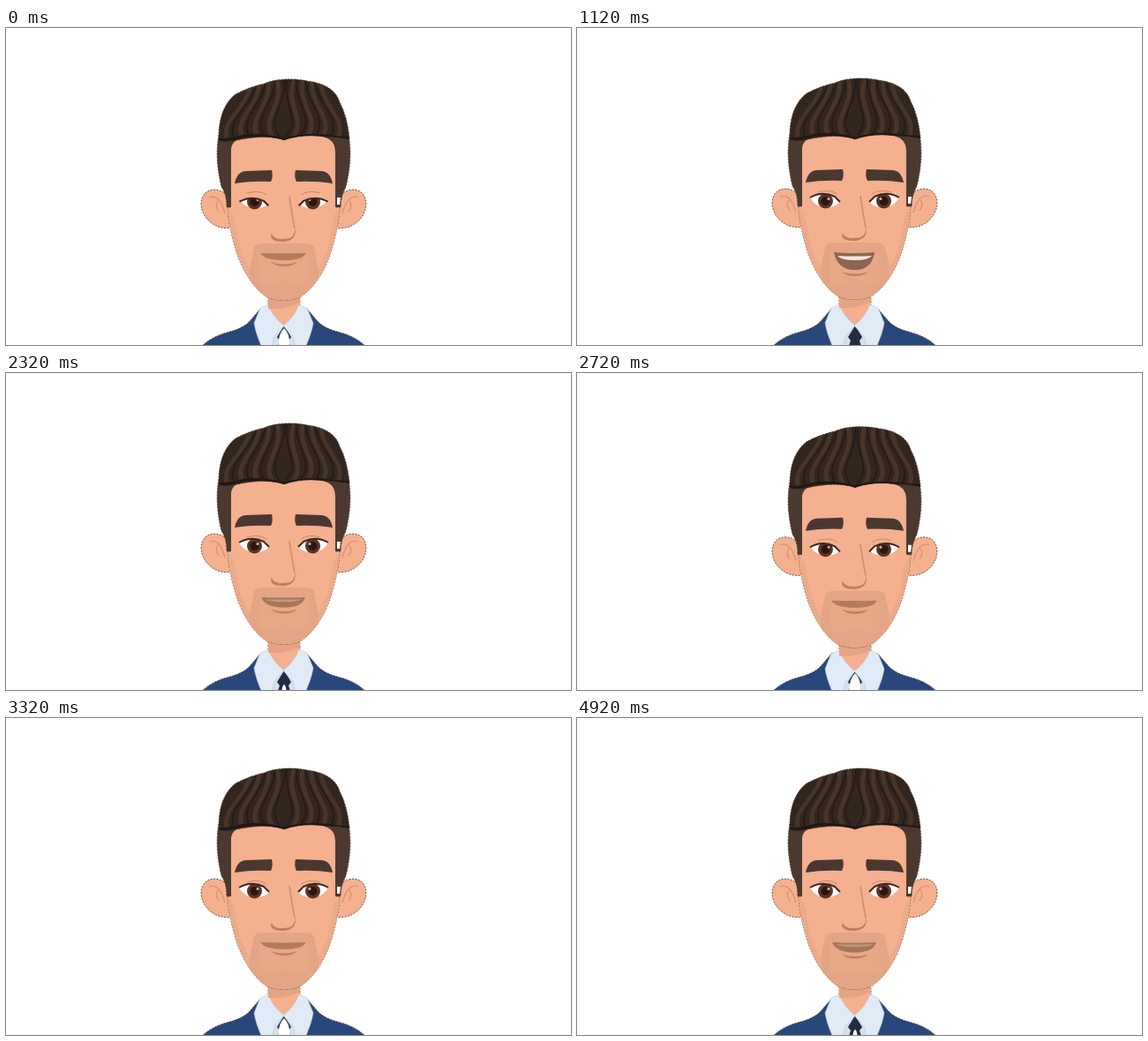
Animation of 640x359 px, one loop 5000 ms. Source, as an HTML page without scripts:

```html
<!DOCTYPE html>
<html lang="en">
<head>
<meta charset="utf-8">
<title>Talking man</title>
<style>
@property --nod { syntax: "<number>"; inherits: true; initial-value: 0; }
@property --lid { syntax: "<number>"; inherits: true; initial-value: 0; }
@property --open { syntax: "<number>"; inherits: true; initial-value: 0; }
@property --gap { syntax: "<number>"; inherits: true; initial-value: 0; }

html, body { margin: 0; width: 100%; height: 100%; overflow: hidden; background: #fff; }
svg { display: block; width: 100vw; height: 100vh; animation: nod 2.5s infinite, blink 2.5s infinite, talk 2.5s infinite, gap 2.5s infinite; }

@keyframes nod {
  0% { --nod: .25; }
  8%, 12% { --nod: 1; }
  56% { --nod: .8; }
  20%, 48%, 64%, 100% { --nod: 0; }
}
@keyframes blink {
  0%, 3% { --lid: 1; }
  10% { --lid: .4; }
  18%, 100% { --lid: 0; }
}
@keyframes talk {
  0%, 12%, 32%, 36%, 56%, 78% { --open: 0; }
  22%, 45%, 48%, 64%, 68% { --open: 1; }
  92%, 100% { --open: .3; }
}
@keyframes gap {
  0%, 12%, 32%, 36% { --gap: 1; }
  44%, 49% { --gap: 0; }
  64%, 100% { --gap: .4; }
}

.head { transform: translateY(calc(var(--nod) * 3.7px)); }
.collar { transform: translateY(calc(var(--nod) * 1px)); }
.lid { transform: translateY(calc(var(--lid) * 4px)); }
.gap { transform: scale(var(--gap)); transform-origin: 315px 361px; }
.mouth {
  transform: scale(calc(1.12 - .12 * var(--open)), calc(.4 + .6 * var(--open)));
  transform-origin: 314px 254px;
  fill: color-mix(in srgb, #8d6653 calc(var(--open) * 100%), #b37b5b);
}
.teeth { opacity: var(--open); }
.chin { transform: translateY(calc(var(--open) * 12px)); }
.edge { stroke: #4a3529; stroke-width: .8; stroke-dasharray: 2 1.5; }
</style>
</head>
<body>
<svg viewBox="0 0 640 359" preserveAspectRatio="none">
  <defs>
    <clipPath id="eyeClip"><path d="M262 180H300V198C290 208 270 208 262 192Z"/></clipPath>
    <path id="hair" d="M241 126Q240 90 260 74Q275 66 293 62C306 56 327 56 341 59Q372 63 378 83Q387 100 389 125Q374 122 360 122Q335 119 315 126Q295 119 262 126Q248 130 241 126Z"/>
    <clipPath id="hairClip"><use href="#hair"/></clipPath>
    <path id="strand" d="M0 0C-14-20 10-34 0-62" stroke-width="5"/>
    <path id="line" d="M0 0C-16-20 4-34 0-62" stroke="#231914" stroke-width="1.4"/>
    <g id="lock"><use href="#strand"/><use href="#line" x="8"/></g>

    <g id="ear">
      <path class="edge" d="M256 196C247 177 221 177 221 199C222 215 238 229 256 225Z" fill="#f4b08f"/>
      <path d="M230 191C238 188 244 194 248 209M240 195Q236 201 241 207" fill="none" stroke="#d98f70" stroke-width="1.2"/>
    </g>

    <g id="eye">
      <path d="M264 192Q278 184 292 191L298 197C290 206 271 206 264 192Z" fill="#fff"/>
      <g clip-path="url(#eyeClip)">
        <circle cx="281.5" cy="196" r="8.5" fill="#5c3424"/>
        <circle cx="281.5" cy="196" r="5" fill="#2c1610"/>
        <circle cx="285" cy="193.5" r="1.5" fill="#c9b5aa"/>
        <g class="lid">
          <path d="M260 170H302V197H298L292 191Q278 184 264 192H260Z" fill="#f4b08f"/>
          <path d="M264 192Q278 184 292 191L298 197" fill="none" stroke="#3a2822" stroke-width="2"/>
        </g>
      </g>
      <path d="M273 186Q286 182 295 188" fill="none" stroke="#c98968"/>
    </g>

    <path id="brow" d="M259 175Q262 161 272 161L301 160Q303 167 300 173Q278 172 259 175Z" fill="#4a3830"/>
    <g id="suit">
      <path class="edge" d="M222 360Q234 349 250 345Q270 340 277 331L289 317L301 366H222Z" fill="#28477a"/>
      <path d="M281 334L291 366" stroke="#1d355f" stroke-width="1.2"/>
    </g>
    <path id="collar" d="M288 317L297 313Q302 327 315 337L304 349L300 366H292Q283 347 281 334Z" fill="#e1ebf6" stroke="#bccbdc" stroke-width=".6"/>
    <path id="jaw" d="M251 202Q252 222 259 246C266 272 281 295 296 304Q315 311 333 304C350 293 363 272 370 246Q377 222 378 202Z"/>
    <clipPath id="jawClip"><use href="#jaw"/></clipPath>
  </defs>

  <rect width="640" height="359" fill="#fff"/>

  <path class="edge" d="M297 296H333V325L315 339L297 325Z" fill="#f4b08f"/>
  <path d="M299 366L304 347L315 336L326 347L330 366Z" fill="#d5e0ed"/>
  <path d="M315 337L323 350L320 354L324 366H306L310 354L307 350Z" fill="#222b40"/>
  <path class="gap" d="M315 340Q323 347 321 366H309Q307 347 315 340Z" fill="#fff"/>
  <use href="#suit"/>
  <use href="#suit" transform="matrix(-1 0 0 1 629 0)"/>
  <g class="collar">
    <use href="#collar"/>
    <use href="#collar" transform="matrix(-1 0 0 1 629 0)"/>
  </g>

  <g class="head">
    <path d="M297 300H333V310Q318 318 297 317Z" fill="#e4a384"/>
    <use href="#ear"/>
    <use href="#ear" transform="matrix(-1 0 0 1 629 0)"/>
    <path class="edge" d="M241 120Q236 146 244 179Q250 187 250 202H379Q379 190 385 179Q393 146 388 120Z" fill="#4b392f"/>
    <path d="M375 191H379L378 199H375Z" fill="#fff"/>

    <use href="#jaw" class="edge" fill="#f4b08f"/>
    <path d="M255 203V138C255 126 265 122 285 121Q304 120 315 126Q330 120 350 121C367 122 373 128 373 140V203Z" fill="#f4b08f"/>
    <g clip-path="url(#jawClip)">
      <path d="M250 202Q259 207 260 225Q265 253 276 272V310H353V272Q366 252 369 225Q371 207 379 202V310H250Z" fill="#ebab8a"/>
      <path d="M276 272L281 248Q282 243 292 243H338Q348 243 349 248L354 272V310H276Z" fill="#e3a585"/>
      <path d="M287 254H342V287L328 291L315 284L301 291L287 287Z" fill="#e7a887"/>
    </g>

    <use href="#hair" class="edge" fill="#33261f"/>
    <g clip-path="url(#hairClip)" fill="none" stroke="#483529" stroke-linecap="round">
      <use href="#lock" transform="translate(250 122) skewX(-24)"/>
      <use href="#lock" transform="translate(267 120) skewX(-18)"/>
      <use href="#lock" transform="translate(284 120) skewX(-12)"/>
      <use href="#lock" transform="translate(301 121) skewX(-6)"/>
      <use href="#lock" transform="translate(326 121) scale(-1 1)"/>
      <use href="#lock" transform="translate(343 119) skewX(6) scale(-1 1)"/>
      <use href="#lock" transform="translate(360 119) skewX(12) scale(-1 1)"/>
      <use href="#lock" transform="translate(377 120) skewX(18) scale(-1 1)"/>
      <path d="M241 126Q255 126 270 121Q295 119 315 125Q334 119 360 121Q375 123 389 124" stroke="#211813" stroke-width="3"/>
    </g>

    <use href="#brow"/>
    <use href="#brow" transform="matrix(-1 0 0 1 629 0)"/>
    <use href="#eye"/>
    <use href="#eye" transform="matrix(-1 0 0 1 629 0)"/>

    <path d="M321 190Q324 211 327 226" fill="none" stroke="#cb8967" stroke-width="1.4"/>
    <path d="M327 225C330 236 323 241 313 241C304 241 298 238 301 232Q303 238 313 238C323 238 328 235 327 225Z" fill="#c07d5c"/>

    <g class="mouth">
      <path d="M291 254Q314 256 337 254Q334 274 315 274Q295 274 291 254Z"/>
      <path class="teeth" d="M295 258Q314 259 334 258Q330 263 315 263Q299 263 295 258Z" fill="#f2e9e2"/>
    </g>
    <path class="chin" d="M300 264Q315 269 330 264Q325 269 315 269Q305 269 300 264Z" fill="#c08062"/>
  </g>
</svg>
</body>
</html>
```
